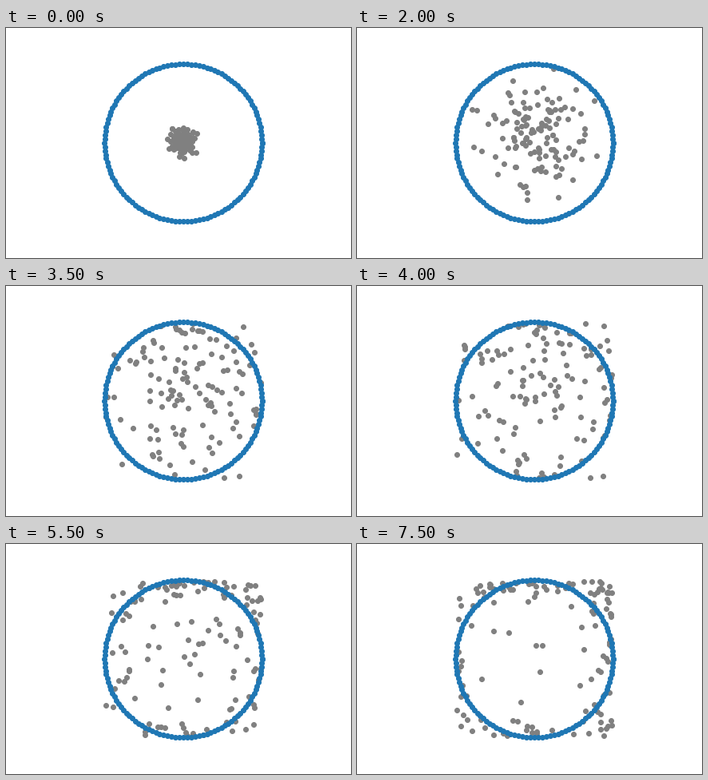
Recreate the animation shown at these times as a matplotlib script. Size 432x288 px, loop 8000 ms.

```python
import numpy as np
import matplotlib.pyplot as plt
from matplotlib.animation import FuncAnimation

W, H = 432, 288
FRAMES, INTERVAL = 16, 500
CENTER = np.array([222.0, 143.6])
RADIUS = 98.6
WALL = 97.0
COUNT = 125

START = 8.5    # spread of the first cluster
NOISE = 11.5   # random part of each step
GAIN = 0.2     # outward push per pixel from the centre
REACH = 130.0  # distance at which the push has faded out
BIAS = np.array([0.6, 0.3])

rng = np.random.default_rng(7)


def walk():
    """Random walk with an outward push inside a square box."""
    pos = np.clip(rng.normal(0, START, (COUNT, 2)), -2.3 * START, 2.3 * START)
    steps = [pos]
    for _ in range(FRAMES - 1):
        dist = np.linalg.norm(pos, axis=1, keepdims=True)
        fade = np.clip(1 - (dist / REACH) ** 2, 0, 1)
        new = pos + GAIN * fade * pos + BIAS + rng.normal(0, NOISE, pos.shape)
        # A move through a wall is dropped along that axis.
        pos = np.where(np.abs(new) > WALL, pos, new)
        steps.append(pos)
    return np.array(steps) + CENTER


track = walk()

fig = plt.figure(figsize=(W / 72, H / 72), dpi=72, facecolor="white")
ax = fig.add_axes([0, 0, 1, 1])
ax.set_xlim(0, W)
ax.set_ylim(H, 0)
ax.axis("off")

dots, = ax.plot([], [], "o", color="gray", ms=6)
angle = np.linspace(0, 2 * np.pi, COUNT)
ax.plot(CENTER[0] + RADIUS * np.cos(angle),
        CENTER[1] + RADIUS * np.sin(angle), "o", color="tab:blue", ms=6)


def update(k):
    dots.set_data(track[k, :, 0], track[k, :, 1])
    return dots,


anim = FuncAnimation(fig, update, frames=FRAMES, interval=INTERVAL,
                     repeat=True, repeat_delay=0)
plt.show()
```
